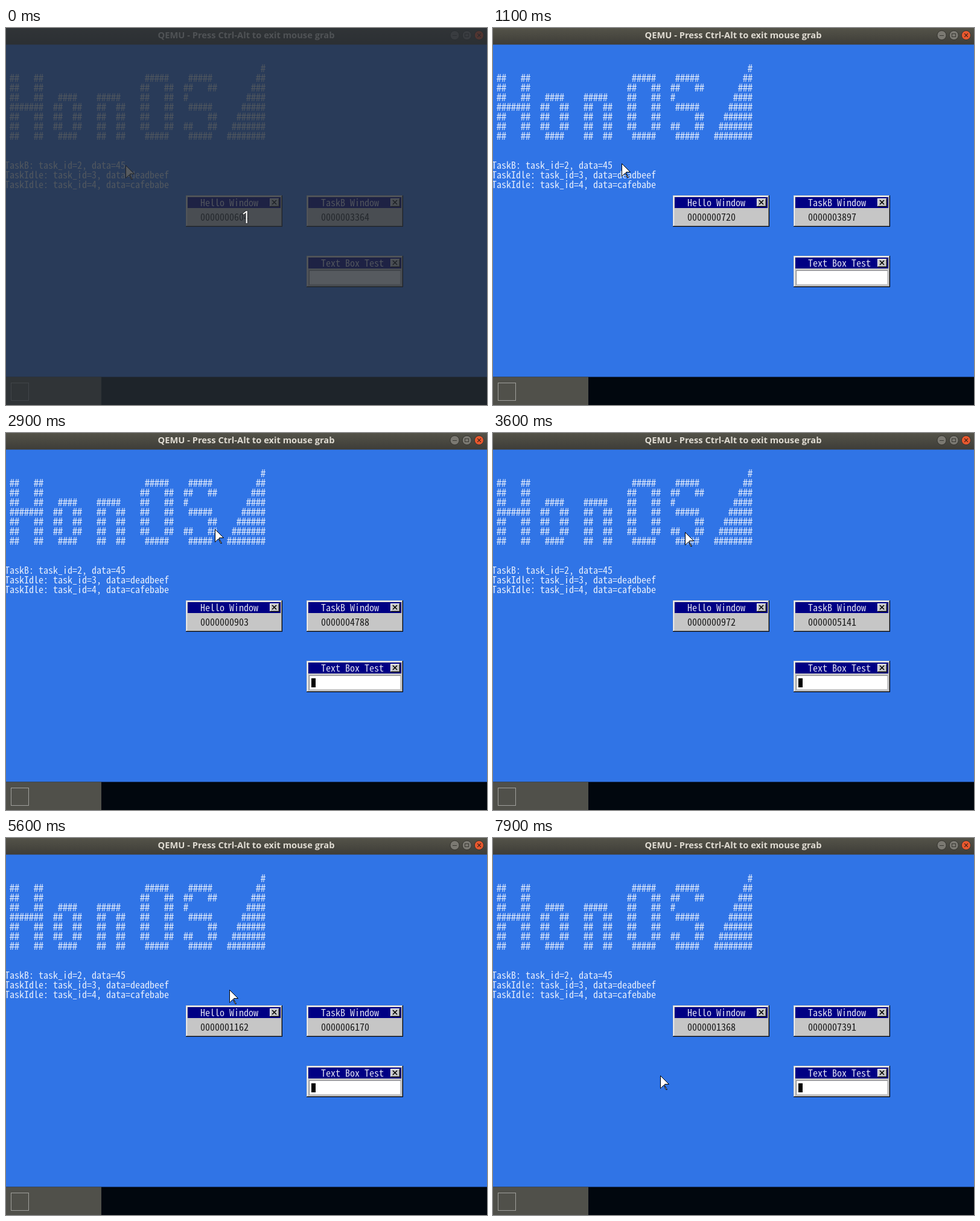
An HTML page with a canvas for the animation above (8000 ms loop, 797 px wide and 624 px high).

```html
<!DOCTYPE html>
<html lang="en">
<head>
<meta charset="utf-8">
<style>
html, body { margin: 0; width: 100%; height: 100%; overflow: hidden; background: #000; }
canvas { display: block; }
</style>
</head>
<body>
<canvas id="stage" width="797" height="624"></canvas>
<script>
const ctx = document.getElementById('stage').getContext('2d');
const MONO = '"Noto Sans Mono CJK JP", "Noto Sans Mono", monospace';
const SANS = '"Open Sans", "Noto Sans", sans-serif';
const LOOP = 8000, STEP = 100;

const banner = [
  '',
  ' ##   ##                     #####    #####',
  ' ##   ##                    ##   ##  ##   ##',
  ' ##   ##   ####    #####    ##   ##  #',
  ' #######  ##  ##   ##  ##   ##   ##   #####',
  ' ##   ##  ##  ##   ##  ##   ##   ##       ##',
  ' ##   ##  ##  ##   ##  ##   ##   ##  ##   ##',
  ' ##   ##   ####    ##  ##    #####    #####',
].map((row, i) => row.padEnd(53 - i) + '#'.repeat(i + 1));

const log = [
  'TaskB: task_id=2, data=45',
  'TaskIdle: task_id=3, data=deadbeef',
  'TaskIdle: task_id=4, data=cafebabe',
];

// Turning points of the pointer: time, x, y
const route = [
  [0, 198, 227], [900, 198, 227], [1800, 265, 214], [2300, 300, 122], [2900, 346, 159],
  [3600, 318, 164], [4400, 489, 293], [5600, 370, 251], [6400, 110, 220], [7900, 277, 393],
];
const arrow = new Path2D('M0 0L14 14H7V16L11 23H9L6 16H5L1 20L0 21Z');

// Counters: the first slows down slightly, the second speeds up
const helloCount = t => 604 + 0.107 * t - 1.3e-6 * t * t;
const taskCount = t => 3364 + 0.48 * t + 3.76e-6 * t * t;
const digits = n => String(Math.round(n)).padStart(10, '0');

function pointerAt(t) {
  const i = Math.max(1, route.findIndex(p => p[0] >= t));
  const [t0, x0, y0] = route[i - 1], [t1, x1, y1] = route[i];
  const u = (t - t0) / (t1 - t0);
  return [x0 + (x1 - x0) * u, y0 + (y1 - y0) * u].map(Math.round);
}

function rect(x, y, w, h, color) {
  ctx.fillStyle = color;
  ctx.fillRect(x, y, w, h);
}

// Console text on an 8 x 16 cell grid
function cells(text, x, y, color, size = 16) {
  ctx.font = `300 ${size}px ${MONO}`;
  ctx.fillStyle = color;
  ctx.textAlign = 'center';
  ctx.globalAlpha = 0.88;
  [...text].forEach((c, i) => c !== ' ' && ctx.fillText(c, x + i * 8 + 4, y + 14));
  ctx.globalAlpha = 1;
}

function line(x0, y0, x1, y1, color, width = 1) {
  ctx.beginPath();
  ctx.moveTo(x0, y0);
  ctx.lineTo(x1, y1);
  ctx.strokeStyle = color;
  ctx.lineWidth = width;
  ctx.stroke();
}

function cross(x, y, r, color, width) {
  line(x - r, y - r, x + r, y + r, color, width);
  line(x + r, y - r, x - r, y + r, color, width);
}

// Raised face: black outside, shadow at the lower right, light at the upper left
function bevel(x, y, w, h) {
  rect(x, y, w, h, '#000');
  rect(x, y, w - 1, h - 1, '#fff');
  rect(x + 1, y + 1, w - 2, h - 2, '#848484');
  rect(x + 1, y + 1, w - 3, h - 3, '#c6c6c6');
}

function panel(x, y, title) {
  rect(x, y, 160, 52, '#000');
  rect(x, y, 159, 51, '#c6c6c6');
  rect(x + 1, y + 1, 158, 50, '#848484');
  rect(x + 1, y + 1, 157, 49, '#fff');
  rect(x + 2, y + 2, 156, 48, '#c6c6c6');
  rect(x + 3, y + 3, 154, 18, '#000084');
  cells(title, x + 24, y + 4, '#fff');
  bevel(x + 139, y + 5, 16, 14);
  cross(x + 146.5, y + 11.5, 3.5, '#000', 1.6);
}

function titleBar() {
  const shade = ctx.createLinearGradient(0, 0, 0, 27);
  shade.addColorStop(0, '#545349');
  shade.addColorStop(1, '#3e3d38');
  rect(0, 0, 797, 27.5, shade);
  ctx.font = '700 14.7px ' + SANS;
  ctx.textAlign = 'center';
  ctx.fillStyle = '#dfdbd2';
  ctx.fillText('QEMU - Press Ctrl-Alt to exit mouse grab', 398, 17);
  ['#7b7972', '#7b7972', '#e8582e'].forEach((color, i) => {
    ctx.beginPath();
    ctx.arc(743.5 + i * 20.2, 12, 7.6, 0, 7);
    ctx.fillStyle = color;
    ctx.fill();
    ctx.strokeStyle = '#35342f';
    ctx.lineWidth = 1;
    ctx.stroke();
  });
  line(740, 12.5, 747, 12.5, '#3a3934');
  ctx.strokeRect(760.5, 9.5, 6, 5);
  cross(784, 12, 2.8, '#3a2019', 1.2);
}

function pointer(x, y) {
  ctx.save();
  ctx.translate(x + 0.5, y + 0.5);
  ctx.fillStyle = '#fff';
  ctx.strokeStyle = '#000';
  ctx.lineWidth = 1;
  ctx.fill(arrow);
  ctx.stroke(arrow);
  ctx.restore();
}

// Countdown shown before the session starts
function veil() {
  rect(0, 0, 797, 624, 'rgba(39, 44, 51, 0.78)');
  ctx.save();
  ctx.font = '28px ' + SANS;
  ctx.textAlign = 'center';
  ctx.shadowColor = '#000';
  ctx.shadowBlur = 3;
  ctx.fillStyle = '#fff';
  ctx.fillText('1', 398, 323);
  ctx.restore();
}

function draw(t) {
  rect(0, 0, 797, 624, '#3074e6');
  titleBar();
  rect(0, 577.5, 797, 47, '#01070e');
  rect(0, 577.5, 158, 47, '#50504a');
  ctx.strokeStyle = '#a0a09c';
  ctx.lineWidth = 1;
  ctx.strokeRect(8.5, 587.5, 29, 29);

  banner.forEach((row, i) => cells(row, -2, 59 + i * 16, '#fff', 18));
  log.forEach((row, i) => cells(row, -2, 219 + i * 16, '#fff'));

  panel(298, 277, 'Hello Window');
  cells(digits(helloCount(t)), 322, 305, '#000');
  panel(498, 277, 'TaskB Window');
  cells(digits(taskCount(t)), 522, 305, '#000');
  panel(498, 377, 'Text Box Test');
  rect(502, 401, 152, 24, '#848484');
  rect(503, 402, 151, 23, '#c6c6c6');
  rect(503, 402, 150, 22, '#fff');
  if (t % 1000 >= 400) rect(506, 406, 7, 15, '#000');

  pointer(...pointerAt(t));
  if (t < STEP) veil();
}

function tick() {
  const t = performance.now() % LOOP;
  draw(Math.floor(t / STEP) * STEP);
  requestAnimationFrame(tick);
}
tick();
</script>
</body>
</html>
```
